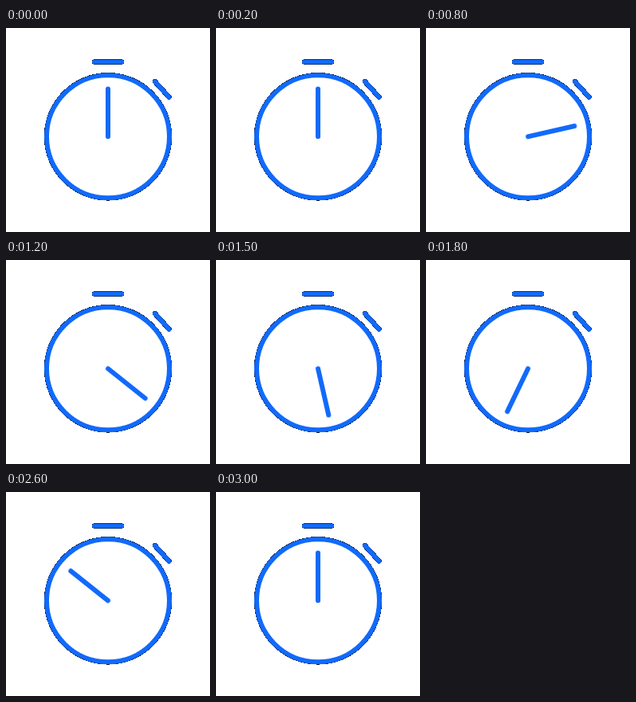
Recreate the animation shown at these times as an HTML page. Size 256 by 256 pixels, loop 3.1 s.

```html
<!DOCTYPE html>
<html lang="en">
<head>
<meta charset="utf-8">
<title>Stopwatch</title>
<style>
  html, body { margin: 0; width: 100%; height: 100%; overflow: hidden; background: #fff; }
  svg { display: block; width: 100vw; height: 100vh; }
  .line { fill: none; stroke: #116afb; stroke-width: 6; stroke-linecap: round; }
  .edge { fill: none; stroke: #000; stroke-width: 6.4; stroke-linecap: round; shape-rendering: crispEdges; }
  .hand { transform-origin: 128px 136.3px; animation: sweep 3.1s infinite; }
  .crown { animation: press 3.1s step-end infinite; }

  /* 200 ms rest, one turn in 28 ticks of 100 ms, 100 ms rest */
  @keyframes sweep {
    0% { transform: rotate(0deg); }
    6.4516% { transform: rotate(0deg); animation-timing-function: steps(28, end); }
    96.7742%, 100% { transform: rotate(360deg); }
  }
  @keyframes press {
    0% { transform: translateY(0); }
    3.2258% { transform: translateY(6px); }
    6.4516%, 100% { transform: translateY(0); }
  }
</style>
</head>
<body>
<svg viewBox="0 0 256 256">
  <!-- dark rim under the soft outer edges -->
  <circle cx="128" cy="136.3" r="80.3" shape-rendering="crispEdges"/>
  <circle cx="128" cy="136.3" r="77" fill="#fff"/>
  <circle class="line" cx="128" cy="136.3" r="77"/>
  <g class="crown">
    <path class="edge" d="M111 42.5H145"/>
    <path class="line" d="M111 42.5H145"/>
  </g>
  <path class="edge" d="M187 67.3L204.6 86.7"/>
  <path class="line" d="M187 67.3L204.6 86.7"/>
  <path class="line hand" d="M128 136.3V76.4"/>
</svg>
</body>
</html>
```
